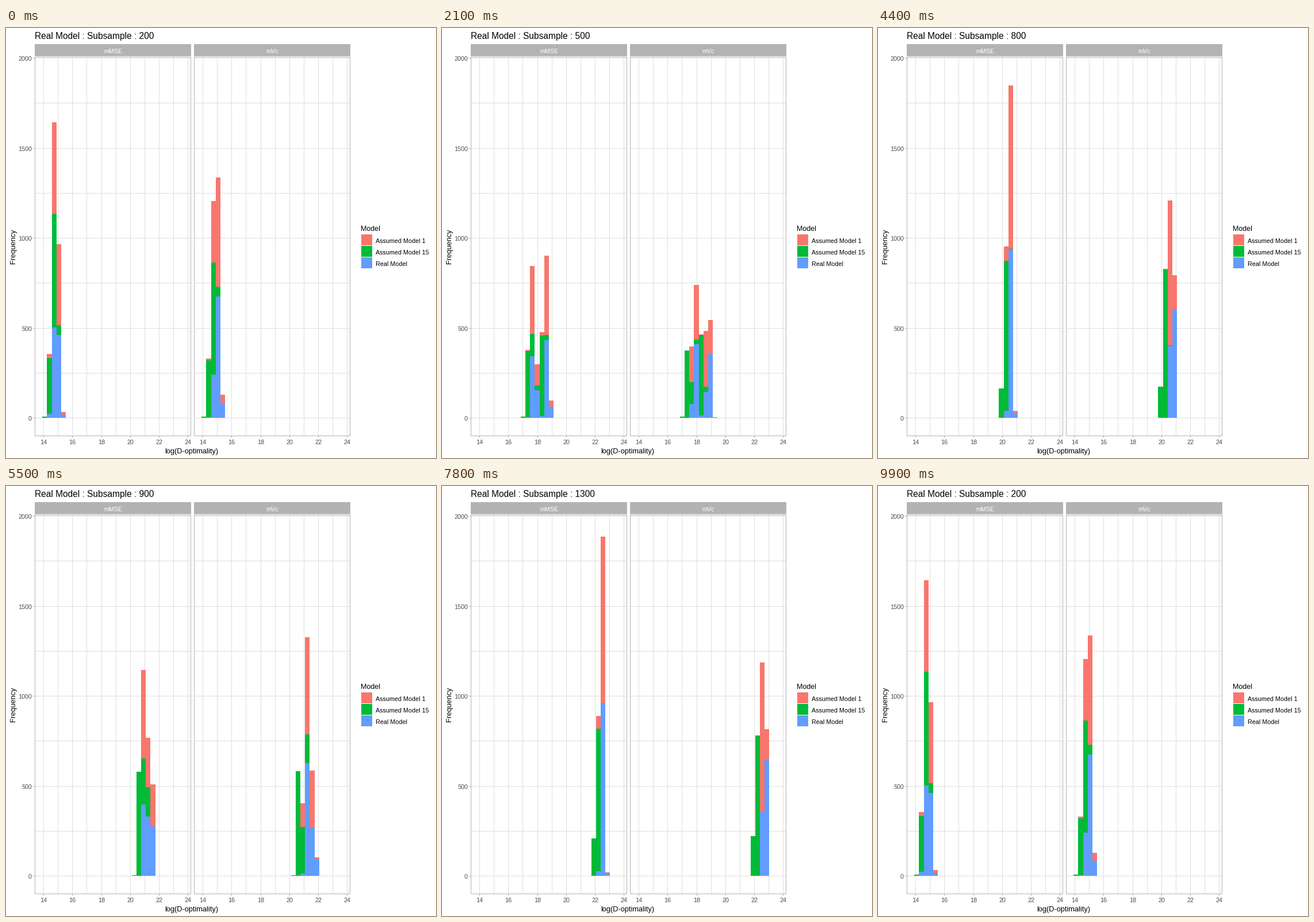
Animation, 748 px wide and 748 px high, one loop 10 s. Source, as a matplotlib script:

```python
import math

import matplotlib.pyplot as plt
import numpy as np
from matplotlib.animation import FuncAnimation
from matplotlib.patches import Rectangle

SIZE, DPI = 748, 100
FRAMES, INTERVAL = 100, 100

BLUE, GREEN, RED = "#619CFF", "#00BA38", "#F8766D"
GRID, EDGE, TICK_TEXT = "#DEDEDE", "#B3B3B3", "#4D4D4D"

SIZES = list(range(200, 1600, 100))
HOLD = 4
STEPS = [4] * 3 + [3] * 3 + [2] + [3] * 7
ARRIVE = np.cumsum([HOLD + s for s in STEPS]) - 1

# per panel, bottom to top: colour, mean bin at the smallest size, extra drift
PANELS = [
    ("mMSE", 50, [(BLUE, 2.97, 0.835), (GREEN, 2.23, 0.2), (RED, 2.96, 0.71)]),
    ("mVc", 327, [(BLUE, 3.336, 1.13), (GREEN, 2.22, 0.2), (RED, 3.19, 0.92)]),
]
BINS, BIN_W, BIN_START = 30, 8.185, 13.15
ZERO_Y, PER_COUNT = 678, 0.313


def px(v):
    return math.floor(v + 0.5)


def count_y(c):
    return px(ZERO_Y - c * PER_COUNT)


def counts(size, start, drift, n=1000):
    """Normal histogram whose mean grows with log(size) while it narrows."""
    ratio = SIZES[0] / size
    mean = start - 12.18 * math.log(ratio) + drift * (1 - ratio)
    sd = 0.2 + 0.28 * ratio
    cdf = [0.5 * (1 + math.erf((k - mean) / (sd * math.sqrt(2)))) for k in range(BINS + 1)]
    return np.round(n * np.diff(cdf))


def stacks(size):
    """Cumulative bar tops, shaped panel x model x bin."""
    return np.array([
        np.cumsum([counts(size, start, drift) for _, start, drift in models], axis=0)
        for *_, models in PANELS
    ])


STATES = [stacks(s) for s in SIZES]

fig = plt.figure(figsize=(SIZE / DPI, SIZE / DPI), dpi=DPI, facecolor="white")
ax = fig.add_axes([0, 0, 1, 1])
ax.set_xlim(0, SIZE)
ax.set_ylim(SIZE, 0)
ax.axis("off")


def box(x, y, w, h, color, z=1):
    return ax.add_patch(Rectangle((x, y), w, h, fc=color, ec="none", lw=0, antialiased=False, zorder=z))


def label(x, y, text, size, color="black", va="baseline", **kw):
    return ax.text(x, y, text, fontsize=size * 72 / DPI, color=color, family="Liberation Sans",
                   va=va, zorder=5, **kw)


def draw_panel(name, left):
    box(left, 28, 272, 21, EDGE)
    label(left + 136, 44, name, 10.75, "white", ha="center")
    for c in range(0, 2001, 250):
        box(left, count_y(c), 272, 1, GRID)
    for k in range(11):
        x = px(left + 15.3 + 25.05 * k)
        box(x, 50, 1, 660, GRID)
        if k % 2 == 0:
            box(x, 710, 1, 3, EDGE)
            label(x + 0.5, 724, str(14 + k), 10.75, TICK_TEXT, ha="center")
    for y in (50, 709):
        box(left, y, 272, 1, EDGE, 4)
    for x in (left, left + 271):
        box(x, 50, 1, 660, EDGE, 4)


def make_bars(p, left, models):
    edges = [px(left + BIN_START + k * BIN_W) for k in range(BINS + 1)]
    for m, (color, *_) in enumerate(models):
        for k in range(BINS):
            yield p, m, k, box(edges[k], ZERO_Y, edges[k + 1] - edges[k], 0, color, 3)


bars = []
for p, (name, left, models) in enumerate(PANELS):
    draw_panel(name, left)
    bars += make_bars(p, left, models)

for c in range(0, 2001, 500):
    box(47, count_y(c), 3, 1, EDGE)
    label(45, count_y(c) + 5, str(c), 10.75, TICK_TEXT, ha="right")

label(323, 740, "log(D-optimality)", 12.7, ha="center")
label(13.3, 379.5, "Frequency", 12.8, va="center", ha="center", rotation=90)

label(617, 353, "Model", 12.5)
for i, (name, color) in enumerate([("Assumed Model 1", RED), ("Assumed Model 15", GREEN), ("Real Model", BLUE)]):
    box(618, 359 + 20 * i, 19, 19, color)
    label(643, 374 + 20 * i, name, 10.75)

title = label(50, 19, "", 15.5)


def pose(frame):
    """Current state, next state and progress between them."""
    for i, (end, steps) in enumerate(zip(ARRIVE, STEPS)):
        if frame < end:
            return i, (i + 1) % len(SIZES), max(0, frame - end + steps) / steps
    return 0, 0, 0


def update(frame):
    a, b, t = pose(frame)
    tops = (1 - t) * STATES[a] + t * STATES[b]
    ys = np.floor(ZERO_Y - tops * PER_COUNT + 0.5)
    for p, m, k, bar in bars:
        base = ys[p, m - 1, k] if m else ZERO_Y
        height = base - ys[p, m, k]
        bar.set_visible(height > 0)
        bar.set_y(ys[p, m, k])
        bar.set_height(height)
    title.set_text(f"Real Model : Subsample : {SIZES[b if t >= 0.5 else a]}")
    return [title] + [bar for *_, bar in bars]


anim = FuncAnimation(fig, update, frames=FRAMES, interval=INTERVAL, repeat=True, repeat_delay=0, blit=False)
plt.show()
```
